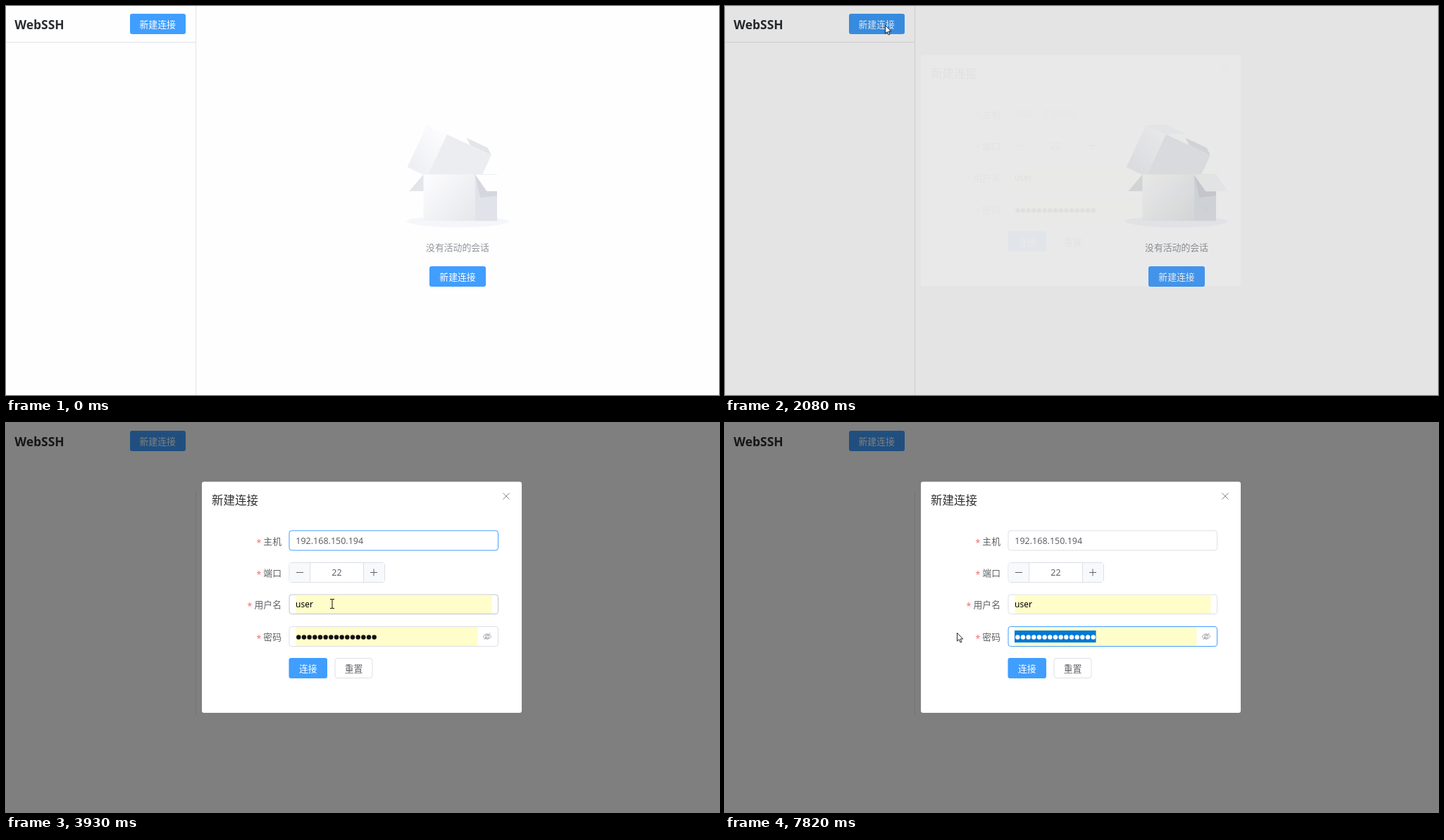
An HTML page for the animation above (8000 ms loop, 1012 px wide and 553 px high).

```html
<!DOCTYPE html>
<html lang="zh-CN">
<head>
<meta charset="utf-8">
<title>WebSSH</title>
<style>
html, body { margin: 0; width: 100%; height: 100%; overflow: hidden; background: #fefefe; }
svg { display: block; }
text { font: 12.85px "Noto Sans CJK SC", "Noto Sans CJK", "Noto Sans", sans-serif; fill: #606266; }
.latin { font: 12.5px "Noto Sans", "Open Sans", sans-serif; }
.mid { text-anchor: middle; }
.end { text-anchor: end; }
.blue { fill: #409eff; }
.white { fill: #fff; }
.black { fill: #000; }
.star { fill: #f56c6c; }
.field { fill: #fff; stroke: #dcdfe6; }
.auto { fill: #fffdc9; }
.pick { fill: #0078d7; }
.icon { fill: none; stroke: #606266; }
</style>
</head>
<body>
<svg id="stage" width="1012" height="553" viewBox="0 0 1012 553">
  <defs>
    <linearGradient id="side" x1=".389" y1="0" x2=".611" y2="1">
      <stop stop-color="#fcfcfd"/><stop offset="1" stop-color="#eeeff3"/>
    </linearGradient>
    <linearGradient id="front" x1="0" y1=".095" x2="1" y2=".905">
      <stop stop-color="#fcfcfd"/><stop offset="1" stop-color="#e6e8ec"/>
    </linearGradient>
    <filter id="soft"><feGaussianBlur stdDeviation="2"/></filter>
    <clipPath id="drag"><rect id="dragBox" x="411" y="290" width="116" height="28"/></clipPath>
  </defs>

  <!-- page -->
  <rect width="1012" height="553" fill="#fefefe"/>
  <path id="rules" d="M269.5 0V553M0 51.5H269" stroke="#e2e4e9"/>
  <text x="12.3" y="32.8" style="font:bold 17.4px 'Noto Sans','Open Sans',sans-serif;fill:#2a2c30">WebSSH</text>
  <rect id="newBtn" class="blue" x="176" y="11" width="79" height="29" rx="3"/>
  <text class="mid white" x="215.2" y="31">新建连接</text>

  <g transform="translate(568.7 157) scale(1.833)">
    <path d="M39.5 86C61.3 86 79 83.9 79 81.3S57.3 78 35.5 78 0 78.8 0 81.3 17.7 86 39.5 86Z" fill="#f5f6fa"/>
    <path d="M13 45H53L42 58H2Z" fill="#e3e5e9"/>
    <g transform="translate(34.5 31.5) scale(-1 1) rotate(-25) translate(-27.5 -21.5)">
      <path d="M0 7H18L23 3H5Z" fill="#e3e5e9"/>
      <path d="M0 7H38V43H0Z" fill="#ecedf1"/>
      <rect x="38" y="7" width="17" height="36" fill="url(#side)"/>
      <path class="flap" d="M55 7H38L24 0H41Z" fill="#f8f9fb"/>
    </g>
    <rect x="13" y="45" width="40" height="36" fill="url(#front)"/>
    <path d="M53 45H70V81H53Z" fill="#e0e3e9"/>
    <path d="M53 45H70V61.5L57 63Z" fill="#d5d7de"/>
    <path d="M53 45H70V58H62Z" fill="#fefefe"/>
    <path class="flap" d="M70 45H53L62 58H79Z" fill="#f6f7fa"/>
  </g>
  <text class="mid" x="641" y="347.6" style="fill:#909399">没有活动的会话</text>
  <rect class="blue" x="601" y="370" width="80" height="29" rx="3"/>
  <text class="mid white" x="641" y="389.6">新建连接</text>

  <!-- dialog -->
  <g id="veil">
    <rect width="1012" height="553" opacity=".5"/>
    <path id="edge" d="M269.5 98V415" stroke="#747474"/>
    <g id="dialog">
      <rect id="shade" x="278" y="95" width="454" height="329" rx="12" opacity=".06" filter="url(#soft)"/>
      <rect class="white" x="278" y="83.5" width="454" height="328.5" rx="3"/>
      <text x="292" y="115.6" style="font-size:16.5px;fill:#303133">新建连接</text>
      <path id="titleBar" d="M293.5 99V120" stroke="#222"/>
      <path class="icon" d="M705.5 99.5l9 9m0-9l-9 9" style="stroke:#84878d"/>
      <g id="labels"></g>

      <rect id="host" class="field" x="402" y="153" width="296.5" height="28" rx="3.5"/>
      <text id="hint" x="411.5" y="172.2" style="fill:#a8abb2">请输入主机地址</text>
      <text id="addr" class="latin" x="411.3" y="172">192.168.150.194</text>
      <path id="hostCaret" d="M412.5 159V175" stroke="#222"/>
      <path id="hostCaret2" d="M508.5 159V175" stroke="#222"/>

      <rect class="field" x="402" y="198.5" width="135.5" height="28" rx="3.5"/>
      <path d="M402.5 199H431V226H402.5ZM508 199H537V226H508Z" fill="#f8f9fb"/>
      <path d="M431.5 199V226M507.5 199V226" stroke="#dcdfe6"/>
      <path class="icon" d="M412 212.5H422M517 212.5H527M522 207.5V217.5"/>
      <text class="latin mid" x="469.5" y="217.2">22</text>

      <rect id="user" class="field" x="402" y="244" width="296.5" height="27.5" rx="3.5"/>
      <rect class="auto" x="411.5" y="244.5" width="278" height="26.5"/>
      <text class="latin black" x="411" y="262.4" style="font-size:12px">user</text>
      <g id="userPick">
        <rect class="pick" x="411" y="250" width="24" height="16"/>
        <text class="latin white" x="411" y="262.4" style="font-size:12px">user</text>
      </g>
      <path id="userCaret" d="M434.7 250V266" stroke="#000"/>

      <rect id="pass" class="field" x="402" y="289.5" width="296.5" height="28" rx="3.5"/>
      <rect class="auto" x="411.5" y="290" width="258" height="27"/>
      <g id="dots" fill="#111"></g>
      <g id="passPick" clip-path="url(#drag)">
        <rect class="pick" x="411" y="295" width="115.5" height="17"/>
        <g id="dots2" fill="#fff"></g>
      </g>
      <path id="passCaret" d="M527.5 296V312" stroke="#000"/>
      <path class="icon" d="M677 303.5q6-7.5 12 0q-6 7.5-12 0ZM680.5 303.5a2.5 2.5 0 0 1 5 0a2.5 2.5 0 0 1-5 0M678.5 308L687.5 298.5" style="stroke:#a0a3aa"/>

      <rect class="blue" x="401.5" y="334" width="54.5" height="29" rx="3"/>
      <text class="mid white" x="428.8" y="354">连接</text>
      <rect class="field" x="467" y="334.5" width="53" height="28" rx="3.5"/>
      <text class="mid" x="493.6" y="354">重置</text>

      <g id="popup">
        <path d="M411.5 272H688.5V335.5q0 3-3 3H414.5q-3 0-3-3Z" fill="#fff" stroke="#7c7c7c"/>
        <circle cx="430.5" cy="290.5" r="7" fill="#8a63f5"/>
        <text class="latin black" x="449" y="287" style="font-size:11px">user</text>
        <text x="449" y="302.6" style="font-size:11px;fill:#444">匹配此网站</text>
        <path d="M415 309.5H685" stroke="#b4b4b4"/>
        <text class="black" x="416" y="327.4" style="font-size:11px">管理密码</text>
      </g>
    </g>
  </g>

  <g id="cursor">
    <path id="arrow" d="M.5.5V12L3.2 9.6 5.2 14 7 13.2 5.1 9H8.7Z" fill="#fff" stroke="#111" stroke-width=".9"/>
    <path id="beam" d="M-3-6.5H-1L0-6 1-6.5H3M0-6V6M-3 6.5H-1L0 6 1 6.5H3" fill="none" stroke="#111"/>
  </g>
</svg>
<script>
const LOOP = 8000;
const $ = id => document.getElementById(id);

// Row labels, right aligned, each with a required mark
$('labels').innerHTML = ['主机', '端口', '用户名', '密码'].map((s, i) => {
  const y = 172.5 + i * 45.4;
  return `<text class="end" x="391" y="${y}">${s}</text>` +
    `<text class="latin end star" x="${388 - s.length * 12.85}" y="${y + 2}">*</text>`;
}).join('');

const dots = Array.from({ length: 15 }, (_, i) =>
  `<circle cx="${415.3 + i * 7.67}" cy="304.5" r="3.2"/>`).join('');
$('dots').innerHTML = $('dots2').innerHTML = dots;

// steps: [time, value, easing]
function play(el, prop, steps, ease = 'linear') {
  const first = steps[0], last = steps[steps.length - 1];
  const frames = [[0, first[1]], ...steps.filter(s => s[0] > 0), [LOOP, last[1]]]
    .map(([t, v, e]) => ({ offset: t / LOOP, [prop]: v, easing: e || ease }));
  el.animate(frames, { duration: LOOP, iterations: Infinity });
}

// Visible only within the given [from, to] spans
function show(el, ...spans) {
  const steps = [[0, 0]];
  for (const [a, b] of spans) {
    if (a === 0) steps[0][1] = 1; else steps.push([a, 1]);
    if (b < LOOP) steps.push([b, 0]);
  }
  play(el, 'opacity', steps, 'steps(1, end)');
}

const move = rows => rows.map(([t, x, y, e]) => [t, `translate(${x}px, ${y}px)`, e]);

const GREY = '#dcdfe6', HOVER = '#c0c4cc', BLUE = '#409eff';

// Page
document.querySelectorAll('.flap').forEach(el => show(el, [1920, LOOP]));
show($('rules'), [0, 2320]);
show($('edge'), [2320, LOOP]);
play($('newBtn'), 'fill', [[0, BLUE], [1600, BLUE], [1700, '#79bbff'], [1910, '#79bbff'],
  [1980, '#337ecc'], [2010, '#337ecc'], [2080, '#3e9bf8'], [2120, BLUE]]);

// Dialog entrance
const fade = [[0, 0], [1960, 0], [2000, .02], [2080, .2], [2120, .46], [2160, .72], [2200, .915], [2240, .97], [2300, 1]];
play($('veil'), 'opacity', fade);
play($('dialog'), 'opacity', fade);
play($('dialog'), 'transform', move([[0, 0, -20], [2000, 0, -20], [2080, 0, -14],
  [2200, 0, -1.7], [2300, 0, 0]]));
show($('shade'), [LOOP, LOOP]);
$('shade').getAnimations().forEach(a => a.cancel());
play($('shade'), 'opacity', [[0, .06], [2220, .06], [2320, 0]]);
show($('titleBar'), [2120, 2300]);

// Fields
play($('host'), 'stroke', [[0, GREY], [2640, GREY], [2720, HOVER], [2760, HOVER], [2960, BLUE],
  [4130, BLUE], [4330, GREY]]);
play($('user'), 'stroke', [[0, GREY], [3800, GREY], [3920, HOVER], [4130, HOVER], [4330, BLUE],
  [6420, BLUE], [6600, GREY]]);
play($('pass'), 'stroke', [[0, GREY], [6600, GREY], [6700, HOVER], [6740, HOVER], [6900, BLUE]]);
show($('hint'), [0, 3330]);
show($('addr'), [3330, LOOP]);
show($('hostCaret'), [2800, 3330]);
show($('hostCaret2'), [3330, 3880]);
show($('userCaret'), [4170, 4700], [5190, 5440]);
show($('passCaret'), [6860, 7140]);
show($('userPick'), [5480, 6420]);
show($('popup'), [5440, 6420]);
show($('passPick'), [7020, LOOP]);
play($('dragBox'), 'transform', move([[0, 116, 0], [7180, 116, 0], [7430, 0, 0]]));

// Pointer
const OUT = 'cubic-bezier(.3, .4, .7, .9)';
play($('cursor'), 'transform', move([
  [0, 536, 548], [200, 536, 545, OUT], [1000, 316, 168, OUT], [1760, 227, 27],
  [2090, 227, 27], [2200, 280, 57, OUT], [2720, 455, 166],
  [3380, 455, 166, 'ease-in-out'], [3920, 463, 257],
  [4700, 463, 257], [4900, 467, 258], [5430, 467, 258], [5520, 379, 269],
  [6180, 379, 269, 'ease-out'], [6420, 326, 285, 'ease-in-out'], [6860, 603, 316],
  [7010, 603, 316, 'ease-in-out'], [7620, 333, 300],
  [7819, 333, 300], [7820, 329, 298]
]));
show($('cursor'), [200, LOOP]);
show($('arrow'), [0, 2640], [5500, 6580], [7820, LOOP]);
show($('beam'), [2640, 5500], [6580, 7820]);
</script>
</body>
</html>
```
